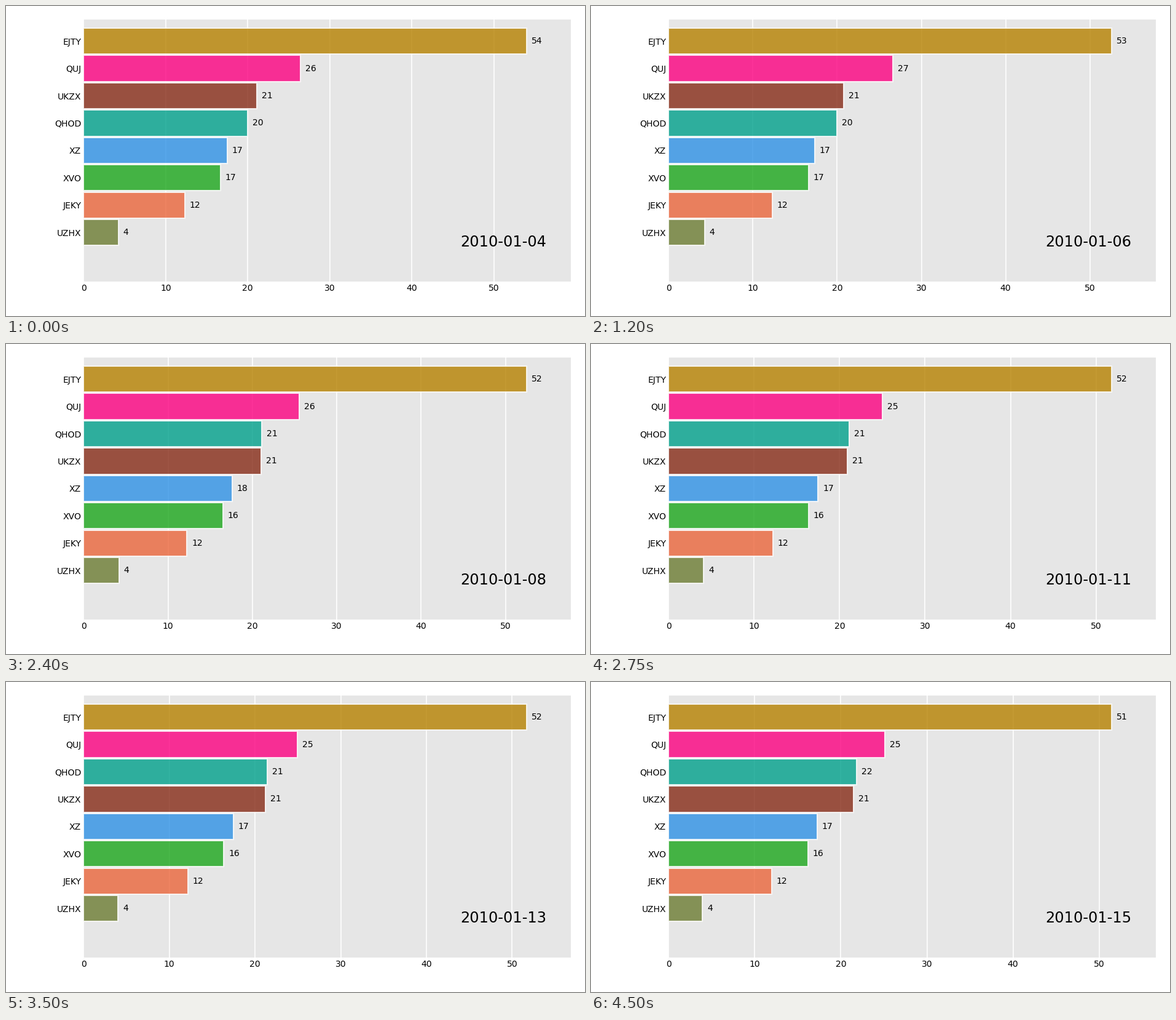
A matplotlib script for the animation above (4550 ms loop, 942 by 504 pixels).

```python
import numpy as np
import matplotlib.pyplot as plt
from matplotlib.animation import FuncAnimation

W, H, DPI = 942, 504, 144
LEFT, RIGHT, TOP, BOTTOM = 126.3, 919, 21.6, 448.15
SLOTS = 9
STEPS = 10          # frames per trading day
INTERVAL = 50

plt.rcParams["font.family"] = "DejaVu Sans"

# trading days of January, weekends skipped
dates = [day for day in range(4, 16) if day not in (9, 10)]
days = np.arange(len(dates))

# name, colour and price at a few key days; rows are in drawing order
KEY_DAYS = (0, 2, 4, 6, 9)
SERIES = [
    ("XZ", "#2E91E5", (17.49, 17.28, 17.50, 17.39, 17.24)),
    ("XVO", "#1CA71C", (16.67, 16.62, 16.485, 16.24, 16.17)),
    ("EJTY", "#B68100", (53.99, 52.52, 52.77, 51.23, 51.44)),
    ("JEKY", "#EB663B", (12.32, 12.30, 12.18, 12.13, 11.95)),
    ("QHOD", "#00A08B", (19.97, 19.70, 20.95, 21.04, 21.81)),
    ("QUJ", "#FC0080", (26.42, 26.76, 25.92, 24.54, 25.10)),
    ("UZHX", "#6C7C32", (4.216, 4.284, 4.22, 4.043, 3.903)),
    ("UKZX", "#862A16", (21.09, 20.705, 20.93, 20.83, 21.456)),
]
names, colors, keys = zip(*SERIES)

# a market swing in percent moves all shares together
swing = np.interp(days, (0, 1, 2, 4, 5, 6, 8, 9),
                  (0, -1.1, 0, 0, 0.8, 0, 1.5, 0))
prices = np.array([np.interp(days, KEY_DAYS, k) for k in keys])
prices *= 1 + swing / 100
# the most expensive share takes the top slot
slots = SLOTS - (-prices).argsort(axis=0).argsort(axis=0)


def blend(table, t):
    return np.array([np.interp(t, days, row) for row in table])


fig = plt.figure(figsize=(W / DPI, H / DPI), dpi=DPI, facecolor="white")
ax = fig.add_axes([LEFT / W, 1 - BOTTOM / H,
                   (RIGHT - LEFT) / W, (BOTTOM - TOP) / H])
ax.set_facecolor(".9")
ax.spines[:].set_visible(False)
ax.set_axisbelow(True)
ax.grid(True, axis="x", color="white", linewidth=0.8)
ax.tick_params(length=0, labelsize=7, pad=2)
ax.set_xticks(range(0, 60, 10))

bars = ax.barh(slots[:, 0], prices[:, 0], height=0.95, color=colors,
               edgecolor="white", linewidth=1, alpha=0.8)
labels = [ax.text(0, 0, "", fontsize=7, ha="left", va="center") for _ in names]
date = ax.text(0.95, 0.15, "", transform=ax.transAxes, fontsize=12,
               ha="right", va="center")
ax.set_ylim(0.2, SLOTS + 0.8)


def update(frame):
    t = frame / STEPS
    values, places = blend(prices, t), blend(slots, t)
    limit = values.max() * 1.1
    ax.set_xlim(0, limit)
    ax.set_yticks(places, labels=names)
    for bar, label, value, y in zip(bars, labels, values, places):
        bar.set_width(value)
        bar.set_y(y - bar.get_height() / 2)
        label.set_position((value + 0.01 * limit, y))
        label.set_text(f"{value:.0f}")
    date.set_text(f"2010-01-{dates[frame // STEPS]:02d}")
    return [*bars, *labels, date]


anim = FuncAnimation(fig, update, frames=(len(dates) - 1) * STEPS + 1,
                     init_func=lambda: update(0), interval=INTERVAL,
                     repeat=True, repeat_delay=0, blit=False)
plt.show()
```
